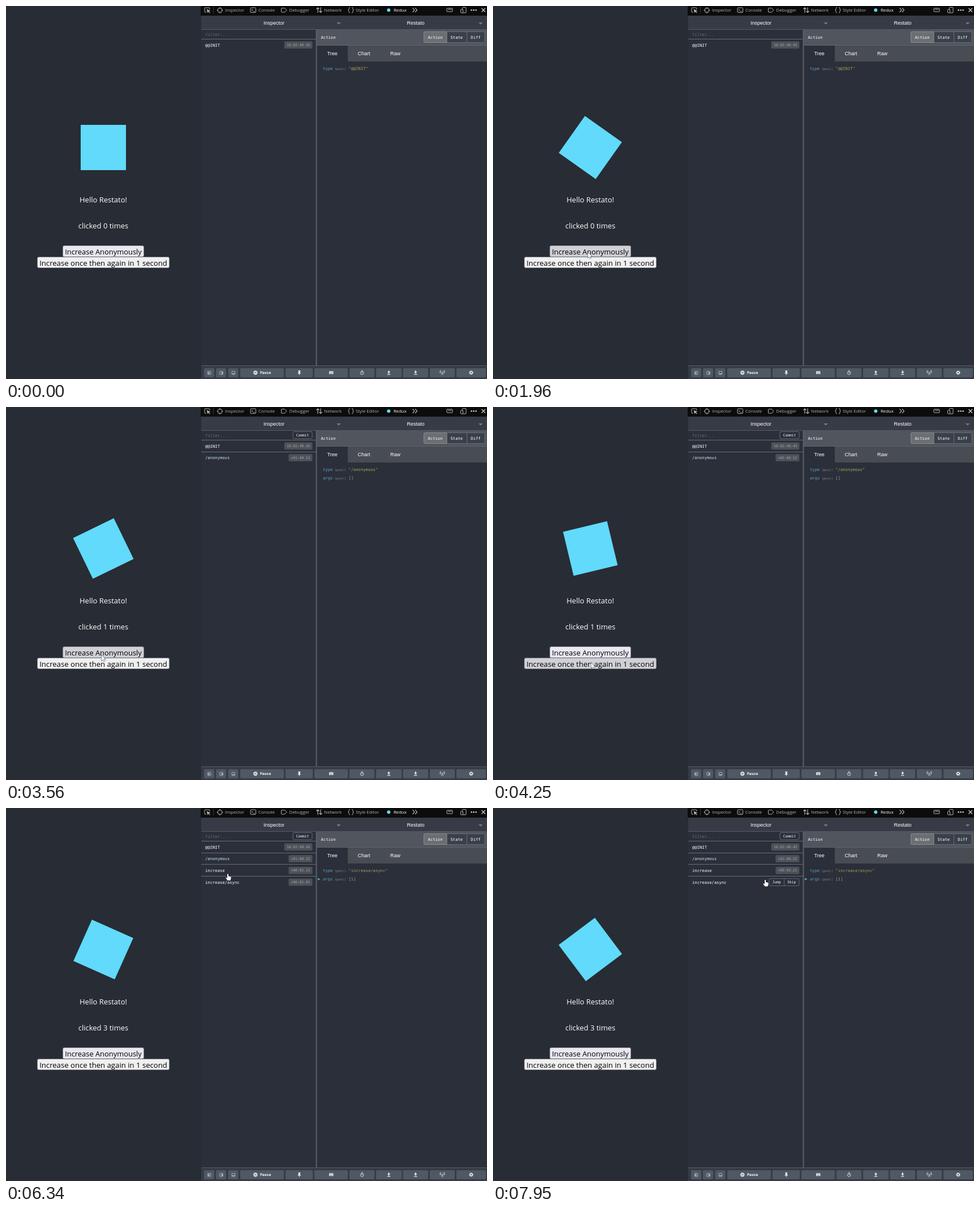
Write an HTML page with a canvas that moves like this. It is 850 by 659 pixels and loops after 8000 ms.

```html
<!DOCTYPE html>
<html lang="en">
<head>
<meta charset="utf-8">
<title>Counter with state inspector</title>
<style>
  html, body { margin: 0; width: 100%; height: 100%; overflow: hidden; background: #282c34; }
  canvas { display: block; }
</style>
</head>
<body>
<canvas id="stage" width="850" height="659"></canvas>
<script>
const ctx = document.getElementById('stage').getContext('2d');
const LOOP = 8000;
const FIRST = 2240, SECOND = 4450, THIRD = 5460;   // store updates
const SPIN = Math.PI * 2 / 20000;

const sans = size => `${size}px "Open Sans", "Noto Sans", sans-serif`;
const arial = size => `${size}px "Liberation Sans", Arial, sans-serif`;
const mono = (size, weight = 'normal') => `${weight} ${size}px "DejaVu Sans Mono", monospace`;

// Pointer stops: time, x, y
const route = [
  [70, 757, 616], [870, 185, 411], [1100, 168, 435.5], [3420, 168, 435.5],
  [3900, 173.5, 452], [4520, 173.5, 452], [4960, 400, 320], [5560, 400, 318],
  [5860, 402, 205], [6130, 400, 52], [6340, 392, 116], [6690, 478, 127],
  [7600, 479, 126.5], [7900, 481, 126.5]
];

function fill(x, y, w, h, color) {
  ctx.fillStyle = color;
  ctx.fillRect(x, y, w, h);
}

function box(x, y, w, h, r, color, border) {
  ctx.beginPath();
  ctx.roundRect(x, y, w, h, r);
  if (color) { ctx.fillStyle = color; ctx.fill(); }
  if (border) { ctx.strokeStyle = border; ctx.lineWidth = 1; ctx.stroke(); }
}

function disc(x, y, r, color) {
  ctx.fillStyle = color;
  ctx.beginPath();
  ctx.arc(x, y, r, 0, Math.PI * 2);
  ctx.fill();
}

function text(s, x, y, font, color, align = 'left') {
  ctx.font = font;
  ctx.fillStyle = color;
  ctx.textAlign = align;
  ctx.fillText(s, x, y);
}

function icon(d, color, width = 1) {
  ctx.strokeStyle = color;
  ctx.lineWidth = width;
  ctx.stroke(new Path2D(d));
}

function shape(d, color) {
  ctx.fillStyle = color;
  ctx.fill(new Path2D(d));
}

function pointer(t) {
  if (t < route[0][0]) return null;
  const i = route.findIndex(p => p[0] > t);
  if (i < 0) return route[route.length - 1].slice(1);
  const [t0, x0, y0] = route[i - 1], [t1, x1, y1] = route[i];
  const u = (t - t0) / (t1 - t0), k = u * u * (3 - 2 * u);
  return [x0 + (x1 - x0) * k, y0 + (y1 - y0) * k];
}

function button(label, x, y, w, h, size, base, state) {
  const color = { rest: base, hover: '#d0d0d7', down: '#b1b1b9' }[state];
  box(x, y, w, h, 2.5, color, '#85858c');
  text(label, x + w / 2, y + 15, sans(size), '#000', 'center');
}

function drawApp(t, count) {
  fill(0, 0, 345, 659, '#282c34');
  ctx.save();
  ctx.translate(172, 250);
  ctx.rotate(t * SPIN);
  fill(-40, -40, 80, 80, '#61dafb');
  ctx.restore();

  text('Hello Restato!', 172, 347, sans(13), '#fff', 'center');
  text(`clicked ${count} times`, 172, 392.5, sans(13), '#fff', 'center');

  const state = (from, to, click) =>
    t > click - 110 && t < click ? 'down' : t >= from && t < to ? 'hover' : 'rest';
  button('Increase Anonymously', 100.5, 423.5, 143, 19.5, 12.9, '#e9e7f0', state(940, 3700, FIRST));
  button('Increase once then again in 1 second', 55.5, 443.5, 233, 19, 13.15, '#f0f0f1', state(3700, 4600, SECOND));
}

function drawToolbar() {
  const c = '#b4b4b8';
  fill(344, 0, 506, 17, '#0c0c0d');
  icon('M354 11H352Q351 11 351 10V4Q351 3 352 3H359Q360 3 360 4V6', c);
  shape('M354.5 5.5L361.5 8.5L358.7 9.3L361 12L360 12.6L357.8 10L356.3 12.4Z', c);
  fill(366, 1, 1, 12, '#38383d');

  box(374.5, 4, 7, 7, 1.5, null, c);
  icon('M378 2V4.5M378 10.5V13M372.5 7.5H375M381 7.5H383.5', c);
  box(432, 3, 9.5, 8.5, 1.5, null, c);
  icon('M434 5.3L436 7.2L434 9.2M437 9.5H439.5', c);
  icon('M486.5 4.5Q486.5 3.8 487.3 3.8H492.5L496 7.3L492.5 11H487.3Q486.5 11 486.5 10.3Z', c);
  icon('M551 12V3M548.5 5.5L551 3L553.5 5.5M556 2.5V11.5M553.5 9L556 11.5L558.5 9', c, 1.2);
  icon('M608 2.5Q606 2.5 606 4.2V5.7Q606 7.2 604.5 7.2Q606 7.2 606 8.8V10.3Q606 12 608 12M611 2.5Q613 2.5 613 4.2V5.7Q613 7.2 614.5 7.2Q613 7.2 613 8.8V10.3Q613 12 611 12', c);
  disc(676.3, 7.3, 3, '#61dafb');

  const tabs = [['Inspector', 387], ['Console', 446], ['Debugger', 500.5], ['Network', 562], ['Style Editor', 618]];
  for (const [label, x] of tabs) text(label, x, 10.3, sans(7.8), c);
  text('Redux', 685, 10.3, sans(7.8), '#fff');

  icon('M718.5 3.5L722 7.2L718.5 11M723 3.5L726.5 7.2L723 11', c, 1.2);
  box(779, 4, 10, 6, 1, null, c);
  icon('M781 6H787.5', c);
  box(806.5, 2.5, 6.5, 9.5, 1, null, c);
  box(803.5, 6, 4, 6, 1, '#0c0c0d', c);
  for (let i = 0; i < 3; i++) disc(822.6 + i * 4, 7.3, 1.3, '#d7d7db');
  icon('M840.5 4L847 10.5M847 4L840.5 10.5', '#d7d7db', 1.2);
}

function drawFooter() {
  const c = '#e8eaec';
  fill(345, 635, 505, 24, '#363c47');
  fill(345, 635, 505, 1, '#565c66');
  const spans = [[350, 368], [371, 389], [392.5, 410.5], [414, 491], [494, 542], [545, 604],
    [607, 651], [654, 699], [701.5, 746], [749, 793], [796, 848]];
  for (const [a, b] of spans) box(a, 640, b - a, 16, 2, '#4f5863');

  for (let i = 0; i < 3; i++) {
    const x = 356.5 + i * 21.3;
    box(x, 645.5, 5.5, 5.5, 0.5, null, '#a9afb6');
    fill(i === 1 ? x + 3 : x + 1, i === 2 ? 649 : 647, i === 2 ? 4 : 2, i === 2 ? 1 : 3, '#c4c9ce');
  }
  disc(440.8, 647.8, 3.6, c);
  fill(439.3, 646.2, 1, 3.2, '#4f5863');
  fill(441.4, 646.2, 1, 3.2, '#4f5863');
  text('Pause', 449, 650.2, mono(6.4, 'bold'), '#fff');
  shape('M516.3 644H520.3V645L519.7 645.4V647.4L521 648.7V649.4H518.8V652H517.8V649.4H515.6V648.7L516.9 647.4V645.4L516.3 645Z', c);
  box(571, 645.3, 7.4, 5, 0.7, c);
  for (let i = 0; i < 3; i++) fill(572 + i * 2, 646.5, 1, 0.8, '#4f5863');
  fill(572.7, 648.6, 4, 0.8, '#4f5863');
  icon('M628 644.2H630.6M629.3 648.4V646.4M632 648.4A2.8 2.8 0 1 1 626.4 648.4A2.8 2.8 0 1 1 632 648.4', c, 0.9);
  shape('M676.5 644L679.2 647.2H677.4V649.5H675.6V647.2H673.8ZM673.8 650.3H679.2V651.5H673.8Z', c);
  shape('M723.8 649.6L721.1 646.4H722.9V644H724.7V646.4H726.5ZM721.1 650.3H726.5V651.5H721.1Z', c);
  icon('M771 646.5L769.5 652M771 646.5L772.5 652M769 644Q767.2 646 769 648.4M773 644Q774.8 646 773 648.4M767.5 643.5Q765.8 646.2 767.5 649M774.5 643.5Q776.2 646.2 774.5 649', c, 0.7);
  ctx.save();
  ctx.setLineDash([1.3, 1.1]);
  icon('M825 647.8A3 3 0 1 1 819 647.8A3 3 0 1 1 825 647.8', c, 1.4);
  ctx.restore();
  icon('M824 647.8A2 2 0 1 1 820 647.8A2 2 0 1 1 824 647.8', c, 1.5);
}

function drawRows(t, count) {
  const rows = [['@@INIT', '10:02:49.45', '#fff'], ['/anonymous', '+01:00.52', '#c4e6f0'],
    ['increase', '+00:02.21', '#fff'], ['increase/async', '+00:01.01', '#fff']];
  text('filter...', 352, 52.5, mono(7.2), '#696e76');
  if (count) {
    box(507, 43.5, 34, 12.5, 2, null, '#666c75');
    text('Commit', 524, 52, mono(6.3), '#fff', 'center');
  }
  rows.slice(0, count + 1).forEach(([name, stamp, color], i) => {
    const y = 69 + i * 20.7;
    fill(345, Math.round(y - 11), 203, 1, '#686d75');
    text(name, 352, y + 2.7, mono(7.2), color);
    if (i === 3 && t >= 6760) {
      box(488, y - 6.3, 53, 12.5, 2, '#2a2f3a', '#666c75');
      fill(514, y - 6, 1, 12, '#666c75');
      text('Jump', 501.2, y + 2, mono(6.3), '#fff', 'center');
      text('Skip', 527.8, y + 2, mono(6.3), '#fff', 'center');
    } else {
      const w = stamp.length * 3.79 + 8;
      box(541.5 - w, y - 6.4, w, 12.7, 2, '#4d5158');
      text(stamp, 537.6, y + 2, mono(6.3), '#a6aaa6', 'right');
    }
  });
}

function drawTree(count) {
  const key = '#629fbd', punct = '#9aaeb5';
  const line = (name, y) => {
    text(name, 560, y, mono(7.2), key);
    text('(pin)', 580.7, y, mono(5.4), '#8b9399');
    text(':', 597, y, mono(7.2), punct);
  };
  const type = ['@@INIT', '/anonymous', 'increase', 'increase/async'][count];
  line('type', 113.2);
  text(`"${type}"`, 605.3, 113.2, mono(7.2), count === 1 ? '#97ad58' : '#a79e5c');
  if (!count) return;
  line('args', 128);
  if (count === 1) {
    text('[]', 605.3, 128, mono(7.2), '#94a58c');
  } else {
    shape('M551.2 123.5L555.4 125.8L551.2 128.1Z', '#58a9d0');
    text('[', 605.3, 128, mono(7.2), '#94a58c');
    text('1', 609.6, 128, mono(7.2), '#b49a62');
    text(']', 614, 128, mono(7.2), '#94a58c');
  }
}

function drawInspector(t, count) {
  fill(345, 17, 505, 642, '#2a2f3a');
  fill(345, 17, 505, 24, '#363b45');
  fill(345, 41, 505, 1, '#555a64');
  text('Inspector', 473.5, 33, arial(9), '#fff', 'center');
  text('Restato', 724, 33, arial(9), '#fff', 'center');
  shape('M584.3 29H591.7L588 32.7Z', '#767b84');
  shape('M835 29H842.4L838.7 32.7Z', '#767b84');

  drawRows(t, count);

  fill(549, 42, 301, 27, '#51555d');
  fill(549, 69, 301, 29, '#484c53');
  fill(549, 69, 301, 1, '#5f636b');
  fill(549, 70, 55, 28, '#2a2f3a');
  fill(547.5, 42, 2, 593, '#5b6069');
  text('Action', 556.5, 58, mono(7.2), '#fff');
  box(738.5, 45.5, 107.5, 19, 2, '#3a4049', '#686c74');
  box(738.5, 45.5, 40.5, 19, [2, 0, 0, 2], '#6b6e73', '#8b8e93');
  fill(814, 46, 1, 18, '#686c74');
  text('Action', 758.5, 58, mono(7.2), '#fff', 'center');
  text('State', 796.3, 58, mono(7.2), '#fff', 'center');
  text('Diff', 830, 58, mono(7.2), '#fff', 'center');
  text('Tree', 576.7, 87, arial(9), '#fff', 'center');
  text('Chart', 632.5, 87, arial(9), '#fff', 'center');
  text('Raw', 688, 87, arial(9), '#fff', 'center');
  drawTree(count);
}

function drawPointer(t) {
  const at = pointer(t);
  if (!at) return;
  const [x, y] = at;
  const overRow = x > 345 && x < 548 && y > 60 && y < 142;
  const d = overRow
    ? 'M-1 .8Q0 -.5 1 .8V4.6Q2 4 2.8 4.9Q3.8 4.4 4.5 5.4Q5.6 5.2 5.6 6.5V8.8L4.4 12H-.5L-3.6 7.8Q-3.6 6.4 -2.2 6.9L-1 8Z'
    : 'M0 0V9.2L2.1 7.2L3.5 10.4L5 9.8L3.6 6.7H6.4Z';
  ctx.save();
  ctx.translate(x, y);
  icon(d, x < 345 ? '#45637a' : '#15171c', 1.2);
  shape(d, '#fff');
  ctx.restore();
}

function draw(now) {
  const t = now % LOOP;
  const count = [FIRST, SECOND, THIRD].filter(e => t >= e).length;
  drawApp(t, count);
  drawInspector(t, count);
  drawToolbar();
  drawFooter();
  drawPointer(t);
}

let start;
function tick(now) {
  start ??= now;
  draw(now - start);
  requestAnimationFrame(tick);
}
draw(0);
requestAnimationFrame(tick);
</script>
</body>
</html>
```
